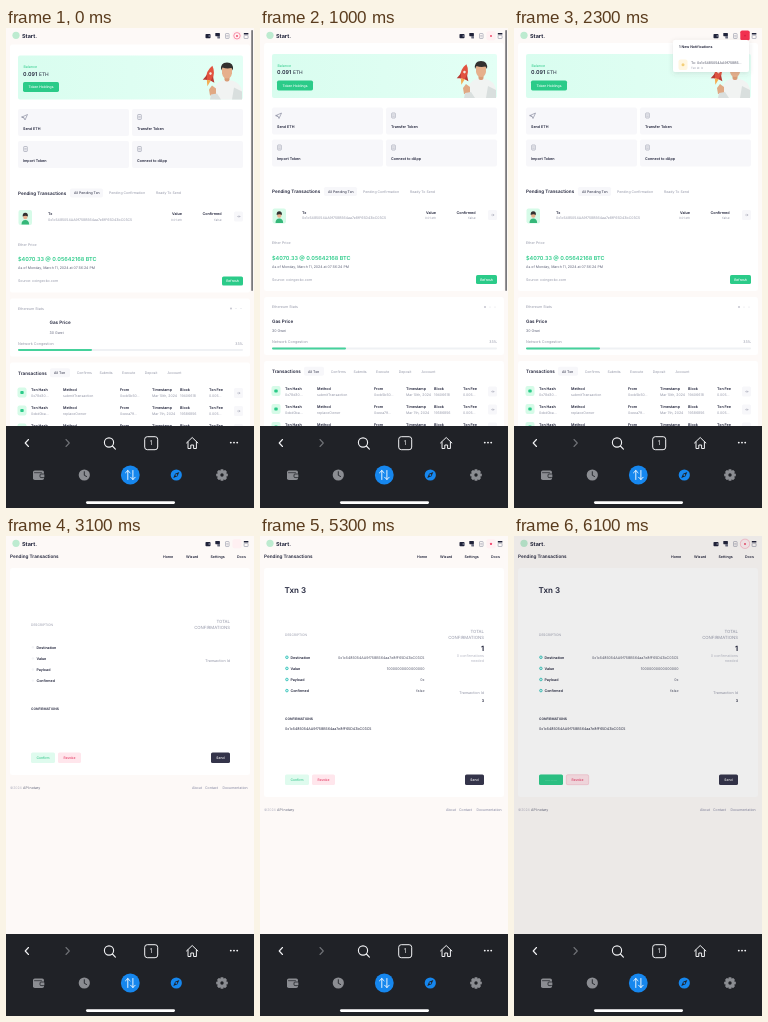
Recreate the animation shown at these times as an HTML page. Size 248 by 480 pixels, loop 6200 ms.

```html
<!DOCTYPE html>
<html lang="en">
<head>
<meta charset="utf-8">
<title>Pending transactions</title>
<style>
html, body { margin: 0; width: 100%; height: 100%; overflow: hidden; background: #fdf9f7; }
svg { display: block; width: 100vw; height: 100vh; }
text { font-family: Inter, "Open Sans", sans-serif; text-rendering: geometricPrecision; white-space: pre; }
</style>
</head>
<body>
<svg id="stage" viewBox="0 0 248 480" preserveAspectRatio="none"></svg>
<script>
const DARK = '#20233a', GREY = '#9497a8', GREEN = '#2bcb89', MINT = '#d6fbe8', PALE = '#f7f7fa', BG = '#fdf9f7';
const HASH = '0x1c5485054AA9f758B564aa7e8fF65D43bC03C5';
const LOOP = 6200;

const rect = (x, y, w, h, fill, r = 0, extra = '') =>
  `<rect x="${x}" y="${y}" width="${w}" height="${h}" rx="${r}" fill="${fill}" ${extra}/>`;
const circle = (x, y, r, fill, extra = '') =>
  `<circle cx="${x}" cy="${y}" r="${r}" fill="${fill}" ${extra}/>`;
const line = (d, color, w = 1) =>
  `<path d="${d}" fill="none" stroke="${color}" stroke-width="${w}" stroke-linecap="round" stroke-linejoin="round"/>`;
const shape = (d, fill) => `<path d="${d}" fill="${fill}"/>`;
const text = (x, y, s, size, fill = DARK, weight = 400, anchor = 'start') =>
  `<text x="${x}" y="${y}" font-size="${size}" fill="${fill}" font-weight="${weight}" text-anchor="${anchor}">${s}</text>`;
const group = (id, body) => `<g id="${id}">${body}</g>`;
const button = (x, y, w, h, label, bg, fg) =>
  rect(x, y, w, h, bg, 1.6) + text(x + w / 2, y + h / 2 + 1.2, label, 3.4, fg, 500, 'middle');
const arrowButton = y => rect(228, y, 9, 10, PALE, 1.5) + line(`M231.5 ${y + 5}h2.4m-.9-.9l.9.9l-.9.9`, '#9497a8', .45);
const docIcon = (x, y) => rect(x - 1.8, y - 2.5, 3.6, 5, 'none', .6, 'stroke="#9497a8" stroke-width=".6"') +
  line(`M${x - .7} ${y - .6}h1.4m-1.4 1.4h1.4`, '#9497a8', .5);

function header() {
  return circle(10, 7.3, 3.6, '#bdebd0') +
    text(16, 10, 'Start.', 5.5, DARK, 700) +
    rect(199.5, 6, 5, 4.2, DARK, .8) + rect(202.5, 7.4, 2, 1.2, '#8d90a3') +
    rect(209.3, 5, 4.6, 3.2, DARK, .6) + rect(211.3, 8, 2.7, 2.6, '#6a6d80', .5) +
    docIcon(221.3, 8) +
    rect(237.8, 5, 4.6, 1.5, DARK, .3) + rect(238.1, 7.3, 4, 3.2, 'none', .4, 'stroke="#8d90a3" stroke-width=".6"') +
    group('bell', rect(226.5, 3.2, 9, 9, '#fff0f2', 1.6) + circle(231, 8, .9, '#ee3d5f', 'id="dot"') +
      circle(231, 7.8, 4, 'none', 'id="ring" stroke="#f1416c" stroke-width=".8"'));
}

function hero() {
  return rect(12, 26, 225, 44, 'url(#mint)', 2) +
    text(17.5, 38.7, 'Balance', 3.6, GREEN) +
    text(17, 46.3, '0.091', 5.4, DARK, 600) + text(33, 46.3, 'ETH', 4.9) +
    button(17, 52.6, 36, 9.8, 'Token Holdings', GREEN, '#fff') +
    // rocket
    '<g transform="rotate(14 204 46)">' +
    shape('M204 36q5 6 3 15h-6q-2-9 3-15z', '#e2523f') +
    shape('M201 46l-3 6l4-1zM207 46l3 6l-4-1z', '#b93a33') +
    circle(204, 44, 1.3, '#f3e6dc') + shape('M202 51h4l-2 6z', '#f4ad52') + '</g>' +
    // person
    shape('M209 70l-1-9q1-7 8-10h10q8 2 10 10v9z', '#f1f3f2') +
    shape('M204 66l-1-6l3-4l4 3v7z', '#e0a883') +
    shape('M204 70l1-5l6-1l4 6zM228 58l8 4v8h-10z', '#d9dfde') +
    rect(218.5, 46, 5, 6, '#d99c77', 2) +
    shape('M216 38h10v6q-1 5-5 5t-5-5z', '#e6b08c') +
    shape('M215 41q-1-8 6-8q7 0 6 8l-1.500-2.500q-5 1-9-.5z', '#33302f');
}

function tile(x, y, label, plane) {
  const icon = plane ? line(`M${x + 4} ${y + 8}l5.5-2.5l-2.5 5.5l-1-2zl2 1`, '#8d90a3', .7) : docIcon(x + 7.5, y + 8);
  return rect(x, y, 111, 27, PALE, 2) + icon + text(x + 5, y + 20.8, label, 3.7, DARK, 600);
}

function pending() {
  const tabs = [['All Pending Txn', 68, DARK], ['Pending Confirmation', 103, GREY], ['Ready To Send', 150, GREY]];
  return text(12, 165.2, 'Pending Transactions', 4.6, DARK, 600) +
    rect(64, 159, 33, 9, PALE, 1.8) +
    tabs.map(([s, x, c]) => text(x, 164.8, s, 3.5, c)).join('') +
    rect(12.5, 180.5, 13.5, 15, MINT, 2) +
    shape('M15.5 195q0-4.5 3.800-4.500t3.800 4.500z', '#35b779') + circle(19.3, 187.6, 2.2, '#e7b18d') +
    shape('M16.7 187q-.4-3.8 2.600-3.800t2.600 3.800q-2.500-1.500-5.200 0z', '#33302f') +
    text(42, 185.7, 'Tx', 3.7, DARK, 600) + text(42, 191.2, HASH, 3.5, GREY) +
    text(176, 185.7, 'Value', 3.7, DARK, 600, 'end') + text(176, 191.2, '0.01 eth', 3, GREY, 400, 'end') +
    text(215.5, 185.7, 'Confirmed', 3.7, DARK, 600, 'end') + text(215.5, 191.2, 'false', 3.2, GREY, 400, 'end') +
    arrowButton(182) +
    text(12, 216, 'Ether Price', 3.6, GREY) +
    text(12, 231.8, '$4070.33 @ 0.05642168 BTC', 5.5, GREEN, 600) +
    text(12, 239.7, 'As of Monday, March 11, 2024 at 07:56:24 PM', 3.55, '#5e6278') +
    text(12, 252.8, 'Source: coingecko.com', 3.6, GREY) +
    button(216, 247, 21, 9, 'Refresh', GREEN, '#fff');
}

function stats() {
  return rect(4, 269, 240, 58, '#fff', 2.5) +
    text(12, 280.4, 'Ethereum Stats', 3.6, GREY) +
    circle(225, 279, 1, '#c5c5cf') + circle(230, 279, .6, '#dcdde4') + circle(235, 279, .6, '#dcdde4') +
    group('slide', text(12, 294.7, 'Gas Price', 4.6, DARK, 600) + text(12, 304, '30 Gwei', 3.6, '#5e6278')) +
    text(12, 315.4, 'Network Congestion', 3.7, GREY) + text(237, 315.4, '33%', 3.5, GREY, 400, 'end') +
    rect(12, 319.6, 225, 1.8, '#eff1f4', .8) + rect(12, 319.6, 74, 1.8, '#45d19b', .8);
}

function transactions() {
  const tabs = ['All Txn', 'Confirms', 'Submits', 'Execute', 'Deposit', 'Account'];
  const cols = [[25, 'Txn Hash'], [57, 'Method'], [114, 'From'], [146, 'Timestamp'], [174, 'Block'], [203, 'Txn Fee']];
  const rows = [
    ['0x78d30...', 'submitTransaction', '0xcb5b50...', 'Mar 10th, 2024', '19406618', '0.005...'],
    ['0xbd0ba...', 'replaceOwner', '0xeea79...', 'Mar 7th, 2024', '19386856', '0.005...'],
    ['0x41c2e...', 'submitTransaction', '0xcb5b50...', 'Mar 7th, 2024', '19386790', '0.004...']
  ];
  return rect(4, 333, 240, 90, '#fff', 2.5) + text(12, 345, 'Transactions', 4.6, DARK, 600) +
    rect(44, 338.8, 20, 9, PALE, 1.8) +
    tabs.map((s, i) => text(48 + 22.7 * i, 344.6, s, 3.5, i ? GREY : DARK)).join('') +
    rows.map((row, r) => {
      const y = 361.6 + 18 * r;
      return rect(11.5, y - 3.5, 9, 10, MINT, 2) + rect(14.3, y, 3.4, 3, GREEN, .8) + arrowButton(y - 3) +
        cols.map(([x, s], i) => text(x, y, s, 3.7, DARK, 600) + text(x, y + 5.9, row[i], 3.5, GREY)).join('');
    }).join('');
}

function homePage() {
  return group('scroll', rect(4, 15, 240, 248, '#fff', 2.5) + hero() +
    tile(12, 79.5, 'Send ETH', true) + tile(126, 79.5, 'Transfer Token') +
    tile(12, 111.5, 'Import Token') + tile(126, 111.5, 'Connect to dApp') +
    pending() + stats() + transactions()) +
    rect(245.3, 2, 1.6, 261, '#6a6a6e', .8, 'id="bar"');
}

function dropdown() {
  return group('active', rect(226.3, 2.5, 9.4, 10, '#f1314f', 1.8) + circle(231, 7.6, .9, '#d81f40')) +
    group('menu', rect(159, 12, 76, 32, '#fff', 2, 'filter="url(#shadow)"') +
      text(165, 20, '1 New Notifications', 3.6, DARK, 600) +
      rect(164.5, 31.5, 9, 10.5, '#fff6e0', 2) + circle(169, 36.8, 1.5, '#f3cf79') +
      text(177, 36.2, 'Tx: 0x1c5485054AA9f758B5...', 3.5, '#4c4f63') + text(177, 41, 'Txn Id: 3', 2.9, GREY));
}

// The detail page is laid out once without and once with its data.
function detail(full) {
  const dy = full ? 10 : 0, low = full ? 22 : 0;
  const values = [HASH, '10000000000000000', '0x', 'false'];
  const rows = ['Destination', 'Value', 'Payload', 'Confirmed'].map((s, i) => {
    const y = 112.6 + dy + 11.1 * i;
    const mark = full ? circle(26.9, y - 1.3, 1.3, '#c9f4f0', 'stroke="#27bdb4" stroke-width=".8"')
      : circle(26.9, y - 1.3, 1.2, '#f4f5f7');
    return mark + text(30.5, y, s, 3.6, DARK, 600) +
      (full ? text(164.5, y, values[i], 3.6, '#4c4f63', 400, 'end') : '');
  }).join('');
  const data = full ? text(24.5, 57, 'Txn 3', 8, DARK, 600) +
    text(224, 115, '1', 7.2, DARK, 700, 'end') +
    text(224, 121.4, '0 confirmations', 3.7, '#b5b7c4', 400, 'end') + text(224, 126.3, 'needed', 3.7, '#b5b7c4', 400, 'end') +
    text(224, 165.8, '3', 3.7, DARK, 600, 'end') + text(25, 193.8, HASH, 3.6, DARK) : '';
  return rect(4, 32, 240, 207 + low, '#fff', 2.5) + rows + data +
    text(25, 90.3 + dy, 'DESCRIPTION', 3.3, GREY) +
    text(224, 86.6 + dy, 'TOTAL', 4.3, GREY, 400, 'end') + text(224, 93.2 + dy, 'CONFIRMATIONS', 4.3, GREY, 400, 'end') +
    text(224, full ? 158.2 : 125.6, 'Transaction Id', 3.7, GREY, 400, 'end') +
    text(25, 174.4 + dy, 'CONFIRMATIONS', 3.3, DARK, 600) +
    button(25, 216.5 + low, 24, 10.5, 'Confirm', '#dffbee', '#37c78d') +
    button(52, 216.5 + low, 23, 10.5, 'Revoke', '#ffe6ec', '#e43b64') +
    button(205, 216.5 + low, 19, 10.5, 'Send', '#34344a', '#fff') +
    text(4, 253.2 + low, '©2024', 3.5, '#b5b5c3') + text(17, 253.2 + low, 'API notary', 3.5, '#5e6278') +
    [[186, 'About'], [199, 'Contact'], [216.5, 'Documentation']]
      .map(([x, s]) => text(x, 253.2 + low, s, 3.5, '#8285a0')).join('');
}

function detailPage() {
  const nav = [[157, 'Home'], [180, 'Wizard'], [204.5, 'Settings'], [231, 'Docs']];
  return text(4, 22.3, 'Pending Transactions', 4.65, DARK, 600) +
    nav.map(([x, s]) => text(x, 22, s, 3.6, DARK, 600)).join('') +
    group('blank', detail(false)) + group('filled', detail(true)) +
    group('pressed', rect(25, 238.5, 24, 10.5, GREEN, 1.6) + text(37, 244.5, '...........', 3.4, '#c4f1dc', 600, 'middle') +
      rect(52.3, 238.8, 22.4, 9.9, '#ffe3e9', 1.6, 'stroke="#f7c3cf" stroke-width=".6"') +
      text(63.5, 244.9, 'Revoke', 3.4, '#e43b64', 500, 'middle'));
}

function browserBar() {
  const white = '#f2f3f5', grey = '#8b8d92', blue = '#1687ee', dark = '#202227';
  const teeth = [0, 45, 90, 135].map(a =>
    rect(214.4, 441.2, 3.2, 11.6, grey, .8, `transform="rotate(${a} 216 447)"`)).join('');
  return rect(0, 398, 248, 82, dark) +
    line('M22.5 411.5l-3.3 3.5l3.3 3.5', white, 1.1) + line('M60 411.5l3.3 3.5l-3.3 3.5', '#707277', 1.1) +
    circle(103, 414.5, 4.6, 'none', `stroke="${white}" stroke-width="1.1"`) + line('M106.4 418l3 3.2', white, 1.1) +
    rect(138.7, 408.7, 13, 13, 'none', 2.6, `stroke="${white}" stroke-width="1"`) + text(145.2, 417.4, '1', 6.5, white, 400, 'middle') +
    line('M180.5 415l5.7-5.5l5.7 5.5M182 414v6.500h2.800v-3.500h2.800v3.500h2.800v-6.500', white, 1) +
    [224.8, 228, 231.2].map(x => circle(x, 414.6, .95, white)).join('') +
    rect(27, 442.5, 11, 9.5, grey, 1.8) + line('M28.500 444.700h7', dark, .7) + rect(34, 446, 4.8, 3.6, grey, 1, `stroke="${dark}" stroke-width=".8"`) +
    circle(78.3, 447, 5.6, grey) + line('M78.3 443.700v3.600l2.300 1.200', dark, .9) +
    circle(124.3, 447, 9.4, blue) +
    line('M121.8 451.500v-9m-2.300 2.300l2.300-2.300l2.300 2.300M126.900 442.500v9m-2.300-2.300l2.300 2.300l2.300-2.300', '#fff', .9) +
    circle(170.3, 447, 5.6, blue) + shape('M173.300 444l-1.800 4.200l-4.200 1.800l1.800-4.200z', dark) + circle(170.3, 447, 1, blue) +
    circle(216, 447, 4.6, grey) + teeth + circle(216, 447, 1.7, dark) +
    rect(80, 473.2, 89, 2.7, '#fff', 1.35);
}

const stage = document.getElementById('stage');
stage.innerHTML = `<defs>
  <linearGradient id="mint"><stop offset="0" stop-color="#d9fdef"/><stop offset="1" stop-color="#e3fff5"/></linearGradient>
  <filter id="shadow" x="-20%" y="-30%" width="140%" height="170%"><feDropShadow dx="0" dy="1.5" stdDeviation="2.5" flood-color="#555" flood-opacity=".15"/></filter>
  </defs>` +
  rect(0, 0, 248, 480, BG) + group('home', homePage()) + group('detail', detailPage()) +
  header() + group('popup', dropdown()) +
  rect(0, 0, 248, 1.6, '#79c6e8', 0, 'id="progress"') +
  rect(0, 0, 248, 398, '#262620', 0, 'id="shade"') + browserBar();

const el = {};
stage.querySelectorAll('[id]').forEach(e => el[e.id] = e);
const ramp = (t, a, b) => Math.min(1, Math.max(0, (t - a) / (b - a)));
const easeOut = p => 1 - (1 - p) ** 2;
const show = (name, on) => el[name].setAttribute('opacity', +on);
const move = (name, x, y) => el[name].setAttribute('transform', `translate(${x} ${y})`);

// Each page runs its own 3.5 s pulse; the ring shows in the last 40 %.
function pulse(t) {
  const p = (t < 2800 ? t + 2700 : Math.max(0, t - 3000)) / 3500;
  const grow = ramp(p, .65, 1);
  el.ring.setAttribute('r', .5 + 4.7 * easeOut(grow));
  show('ring', ramp(p, .6, .65) * (1 - grow));
}

function draw(t) {
  const settle = 1 - easeOut(ramp(t, 0, 700));
  const onHome = t < 2800, loaded = t >= 3500;
  show('home', onHome);
  show('detail', !onHome);
  show('blank', !loaded);
  show('filled', loaded);
  show('dot', onHome || loaded);
  move('scroll', 0, 1.5 * settle);
  move('slide', 31.5 * settle, 0);
  show('bar', 1 - ramp(t, 1700, 2100));
  pulse(t);

  const open = easeOut(ramp(t, 1600, 2000));
  show('popup', onHome);
  show('active', ramp(t, 1400, 1600));
  show('menu', open);
  move('menu', 0, 4 * (1 - open));

  el.progress.setAttribute('width', 248 * easeOut(ramp(t, 3100, 3900)));
  show('progress', 1 - ramp(t, 4100, 4300));
  show('pressed', ramp(t, 5900, 6100));
  show('shade', .075 * ramp(t, 5900, 6100));
}

const start = performance.now();
function tick() {
  const t = (performance.now() - start) % LOOP;
  draw(Math.floor(t / 100) * 100);
  requestAnimationFrame(tick);
}
tick();
</script>
</body>
</html>
```
